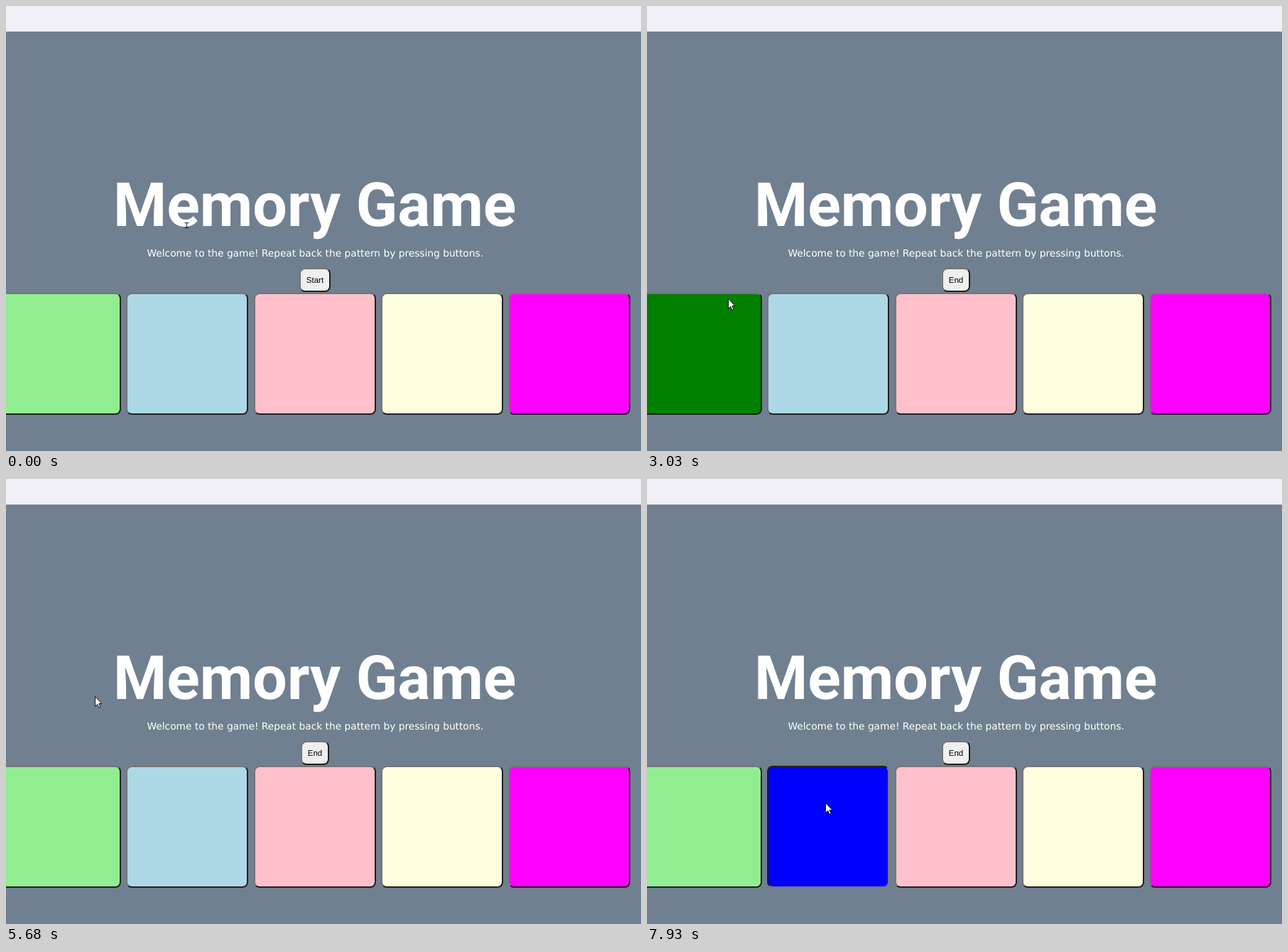
Animation, 894 px wide and 627 px high, one loop 8000 ms. Source, as an HTML page:

```html
<!DOCTYPE html>
<html lang="en">
<head>
<meta charset="utf-8">
<title>Memory Game</title>
<style>
html, body { margin: 0; width: 100%; height: 100%; overflow: hidden; }
body { position: relative; background: #708090; }
.bar { position: absolute; width: 100%; height: 36px; background: #f1f0f7; }
.button {
  position: absolute; box-sizing: border-box;
  border: 2px solid; border-color: #767676 #212121 #212121 #767676;
  border-radius: 8px;
}
.button.pressed { border-color: #212121 #767676 #767676 #212121; }
.tile { top: 404px; width: 172px; height: 172px; }
#toggle { left: 413px; top: 369px; width: 44px; height: 34px; background: #efefef; }
#toggle.started { left: 415px; width: 40px; }
svg { position: absolute; left: 0; top: 0; text-rendering: geometricPrecision; }
</style>
</head>
<body>
<div class="bar"></div>
<div class="button" id="toggle"></div>
<svg width="894" height="627">
  <text x="151" y="310" fill="#fff" font-family="Roboto, sans-serif" font-weight="700" font-size="86">Memory Game</text>
  <text x="198.5" y="353" fill="#fff" font-family="'DejaVu Sans', sans-serif" font-size="13.75">Welcome to the game! Repeat back the pattern by pressing buttons.</text>
  <text id="label" x="435" y="390" text-anchor="middle" font-family="'Liberation Sans', Arial, sans-serif" font-size="11.5"></text>
  <g id="cursor">
    <path id="arrow" d="M.5.5V14.3L3.7 11.4 5.8 16.4 8 15.4 5.9 10.6H10Z" fill="#fff" stroke="#111"/>
    <path id="beam" d="M-2.5-3.5H3.5M.5-3.5V3.5M-2.5 3.5H3.5" fill="none" stroke="#222"/>
  </g>
</svg>
<script>
const LOOP = 8000, FLASH = 1000, START_CLICK = 1240;
const $ = id => document.getElementById(id);
const during = (t, from, length) => t >= from && t < from + length;

// The pointer rests between these straight moves
const moves = [
  { from: 60, to: 840, x: 410, y: 386 },
  { from: 870, to: 1090, x: 434, y: 378 },
  { from: 1575, to: 1690, x: 110, y: 397 },
  { from: 1840, to: 2020, x: 117, y: 383 },
  { from: 2670, to: 3460, x: 110, y: 446 },
  { from: 4440, to: 4780, x: 124, y: 282 },
  { from: 4780, to: 4900, x: 125, y: 306 },
  { from: 6980, to: 7410, x: 116, y: 440 },
  { from: 7540, to: 7930, x: 251, y: 456 }
];

function pointerAt(t) {
  let x = 254, y = 309;
  for (const move of moves) {
    const k = Math.min(1, Math.max(0, (t - move.from) / (move.to - move.from)));
    x += (move.x - x) * k;
    y += (move.y - y) * k;
  }
  return [Math.round(x), Math.round(y)];
}

const tiles = [
  { color: 'lightgreen', lit: 'green', flashes: [2200, 4680], presses: [3520, 7410] },
  { color: 'lightblue', lit: 'blue', flashes: [6020], presses: [7900] },
  { color: 'pink' },
  { color: 'lightyellow' },
  { color: 'magenta' }
].map((tile, i) => {
  const el = document.createElement('div');
  el.className = 'button tile';
  el.style.left = Math.round(-10.2 + 179.4 * i) + 'px';
  $('toggle').before(el);
  return { flashes: [], presses: [], ...tile, el };
});

function draw(t) {
  for (const { el, color, lit, flashes, presses } of tiles) {
    const pressed = presses.some(at => during(t, at, 150));
    const flashing = flashes.some(at => during(t, at, FLASH));
    el.classList.toggle('pressed', pressed);
    el.style.background = pressed || flashing ? lit : color;
  }

  const started = t >= START_CLICK;
  $('toggle').classList.toggle('started', started);
  $('toggle').classList.toggle('pressed', during(t, START_CLICK - 120, 120));
  $('label').textContent = started ? 'End' : 'Start';

  const [x, y] = pointerAt(t);
  const overText = !started && y < 358;
  $('cursor').setAttribute('transform', `translate(${x} ${y})`);
  $('beam').style.display = overText ? '' : 'none';
  $('arrow').style.display = overText ? 'none' : '';
}

const start = performance.now();
function tick() {
  draw((performance.now() - start) % LOOP);
  requestAnimationFrame(tick);
}
tick();
</script>
</body>
</html>
```
